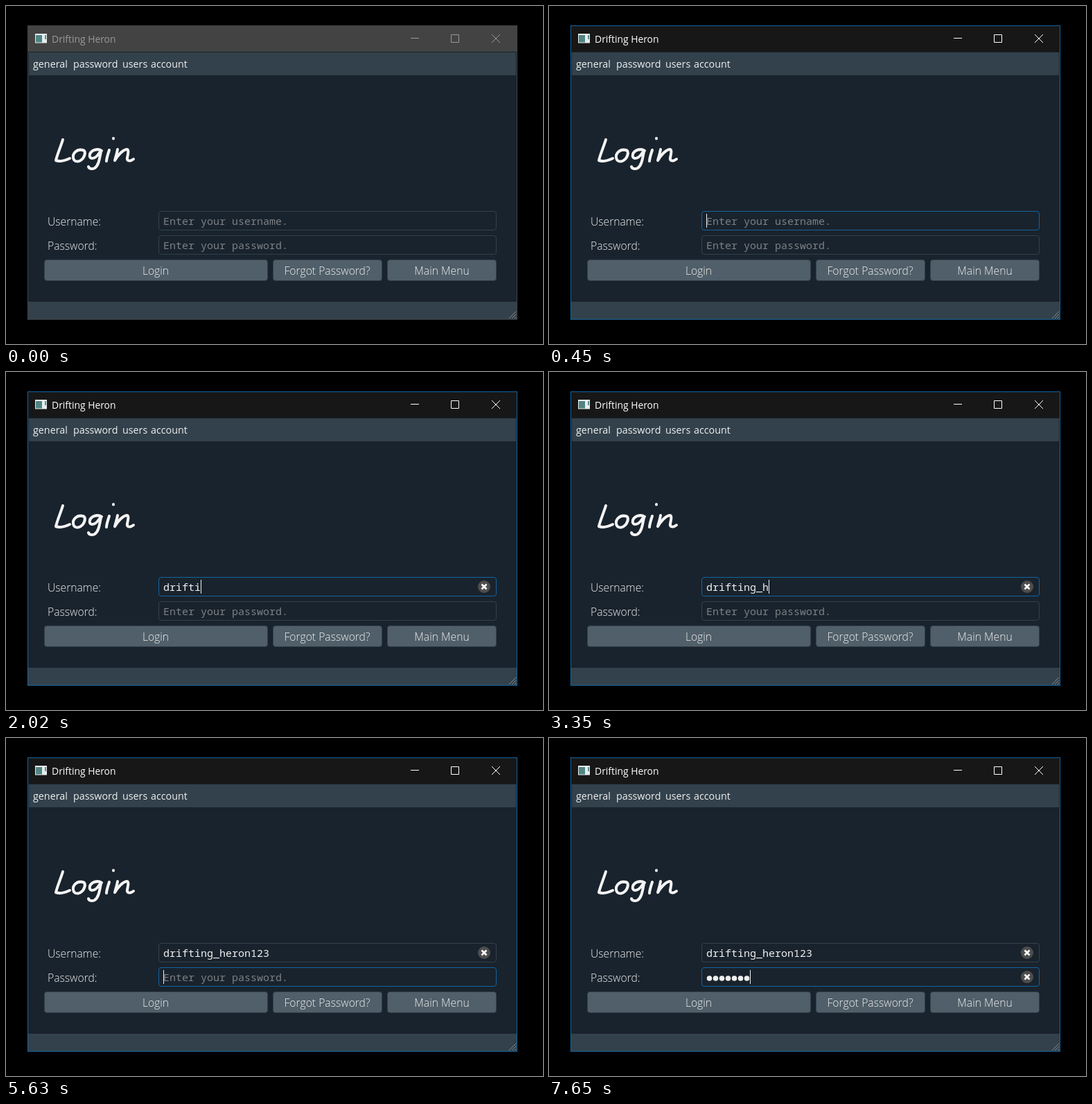
Write an HTML page that moves like this. It is 775 px wide and 488 px high and loops after 8000 ms.

```html
<!DOCTYPE html>
<html lang="en">
<head>
<meta charset="utf-8">
<style>
  html, body { margin: 0; width: 100%; height: 100%; overflow: hidden; background: #000; }
  svg { display: block; width: 775px; height: 488px; font-family: "Open Sans", "Noto Sans", sans-serif; }
  text { fill: #f0f0f0; }
  .label { font-size: 15.7px; font-weight: 300; }
  .menu { font-size: 14.3px; }
  .mid { text-anchor: middle; }
  .mono { font: 15px "Noto Sans Mono", "DejaVu Sans Mono", monospace; }
  .hint { fill: #7c8084; }
  .box { fill: #19232d; stroke: #32414b; }
  .button { fill: #505f69; stroke: #32414b; }
  .ink { fill: none; stroke: #f4f4f4; stroke-width: 4; stroke-linecap: round; stroke-linejoin: round; }
</style>
</head>
<body>
<svg viewBox="0 0 775 488">
  <rect id="frame" x="31.5" y="28.5" width="706" height="424" fill="#19232d"/>
  <rect id="bar" x="32" y="29" width="705" height="37"/>
  <rect x="33" y="67" width="703" height="33" fill="#32414b"/>
  <rect x="32" y="427" width="705" height="25" fill="#32414b"/>
  <path d="M726 451L736 441M730 451L736 445M734 451L736 449" stroke="#88888c"/>

  <rect x="42" y="40" width="17" height="13.5" fill="#e8ecec"/>
  <rect x="43" y="42" width="9" height="10.5" fill="#4f8583"/>
  <rect x="56" y="42" width="2" height="6" fill="#5c918f"/>
  <text id="title" x="66" y="53" font-size="13.9">Drifting Heron</text>
  <path id="controls" d="M584 46.5H596M642.5 41.5H653.5V52.5H642.5ZM701 41L713 53M713 41L701 53" fill="none"/>

  <g class="menu">
    <text x="39" y="89">general</text>
    <text x="97" y="89">password</text>
    <text x="168" y="89">users</text>
    <text x="209" y="89">account</text>
  </g>

  <g class="ink" role="img" aria-label="Login">
    <path d="M82 193C79 203 74 214 72 223C78 225 86 223 92 220"/>
    <path d="M111 208C102 206 96 213 97 219C98 226 106 226 111 220C115 214 115 208 110 208"/>
    <path d="M138 209C132 205 123 208 121 214C119 222 128 222 134 213L137 210C135 220 134 230 128 234C124 236 120 235 119 232"/>
    <path d="M149 208C147 214 145 220 145 224M155 191V191.5"/>
    <path d="M161 207C160 213 158 219 157 223C161 216 168 208 174 207C178 207 176 214 175 219C174 224 179 225 184 221"/>
  </g>

  <g class="label">
    <text x="60" y="317">Username:</text>
    <text x="60" y="352">Password:</text>
    <rect class="button" x="55.5" y="366.5" width="322" height="30" rx="3.5"/>
    <rect class="button" x="385.5" y="366.5" width="157" height="30" rx="3.5"/>
    <rect class="button" id="home" x="550.5" y="366.5" width="157" height="30" rx="3.5"/>
    <text class="mid" x="216" y="388">Login</text>
    <text class="mid" x="463.5" y="388">Forgot Password?</text>
    <text class="mid" x="629" y="388">Main Menu</text>
  </g>
  <g id="fields"></g>
</svg>
<script>
const LOOP = 8000, FOCUS = 450, SWITCH = 5630;
const HOVER = "#148cd2", ACTIVE = "#1464a0", IDLE = "#32414b";
const $ = id => document.getElementById(id);

// [time, typed length]; the third value hides the caret
const user = {
  y: 296, hint: "Enter your username.", value: "drifting_heron123", from: FOCUS, to: SWITCH, start: 1240,
  keys: [[0, 0], [1000, 0, 1], [1240, 1], [1400, 2], [1640, 3], [1710, 4], [1780, 5], [2020, 6],
    [2100, 7], [2190, 8], [2270, 9], [2810, 8], [2970, 9], [3350, 10], [3900, 10, 1], [4060, 11],
    [4140, 12], [4360, 13], [4450, 14], [5070, 14, 1], [5220, 15], [5300, 16], [5390, 17]]
};
const pass = {
  y: 331, hint: "Enter your password.", from: SWITCH, to: LOOP, start: 6320,
  keys: [[0, 0], [6160, 0, 1], [6320, 1], [6570, 2], [6880, 3], [7030, 4], [7270, 5], [7490, 6], [7650, 7]]
};
const fields = [user, pass];

const dots = Array.from({ length: 7 }, (_, i) =>
  `<circle class="dot" cx="${231.5 + 9 * i}" cy="347" r="3.8" fill="#f0f0f0"/>`).join("");

$("fields").innerHTML = fields.map(({ y }) => `<g>
  <rect class="box" x="220.5" y="${y + .5}" width="487" height="27" rx="3.5"/>
  <text class="mono" x="227" y="${y + 20}"></text>
  <rect class="caret" x="227" y="${y + 4}" width="1" height="20" fill="#f0f0f0"/>
  <g class="clear" transform="translate(690 ${y + 14})">
    <circle r="9" fill="#4d4d4d"/>
    <path d="M-3.5 -3.5L3.5 3.5M3.5 -3.5L-3.5 3.5" stroke="#fff" stroke-width="2.6"/>
  </g></g>`).join("") + dots;

fields.forEach((f, i) => {
  const g = $("fields").children[i];
  for (const name of ["box", "mono", "caret", "clear"]) f[name] = g.querySelector("." + name);
});
const dotList = document.querySelectorAll(".dot");
const within = (t, a, b) => t >= a && t < b;
const show = (el, on) => el.setAttribute("visibility", on ? "visible" : "hidden");

function drawField(f, t, hover) {
  const [, n, off] = f.keys.findLast(k => k[0] <= t);
  const focus = within(t, f.from, f.to);
  f.box.style.stroke = focus ? ACTIVE : hover ? HOVER : IDLE;
  f.mono.textContent = n ? (f.value || "").slice(0, n) : f.hint;
  f.mono.classList.toggle("hint", !n);
  f.caret.setAttribute("x", 227 + 9 * n);
  show(f.caret, focus && !off);
  f.clear.setAttribute("opacity", Math.max(0, Math.min(1, Math.floor((t - f.start) / 80) / 2)));
  return n;
}

function draw(t) {
  const on = t >= FOCUS, tone = on ? "#fff" : "#9a9a9a";
  $("frame").setAttribute("stroke", on ? "#1464a0" : "#434343");
  $("bar").setAttribute("fill", on ? "#171717" : "#434343");
  $("title").style.fill = tone;
  $("controls").setAttribute("stroke", tone);
  $("home").style.stroke = within(t, 70, 150) ? HOVER : IDLE;
  drawField(user, t, false);
  const n = drawField(pass, t, within(t, 230, 310) || within(t, 5390, SWITCH));
  dotList.forEach((d, i) => show(d, i < n));
}

const begin = performance.now();
function tick() {
  draw((performance.now() - begin) % LOOP);
  requestAnimationFrame(tick);
}
tick();
</script>
</body>
</html>
```
